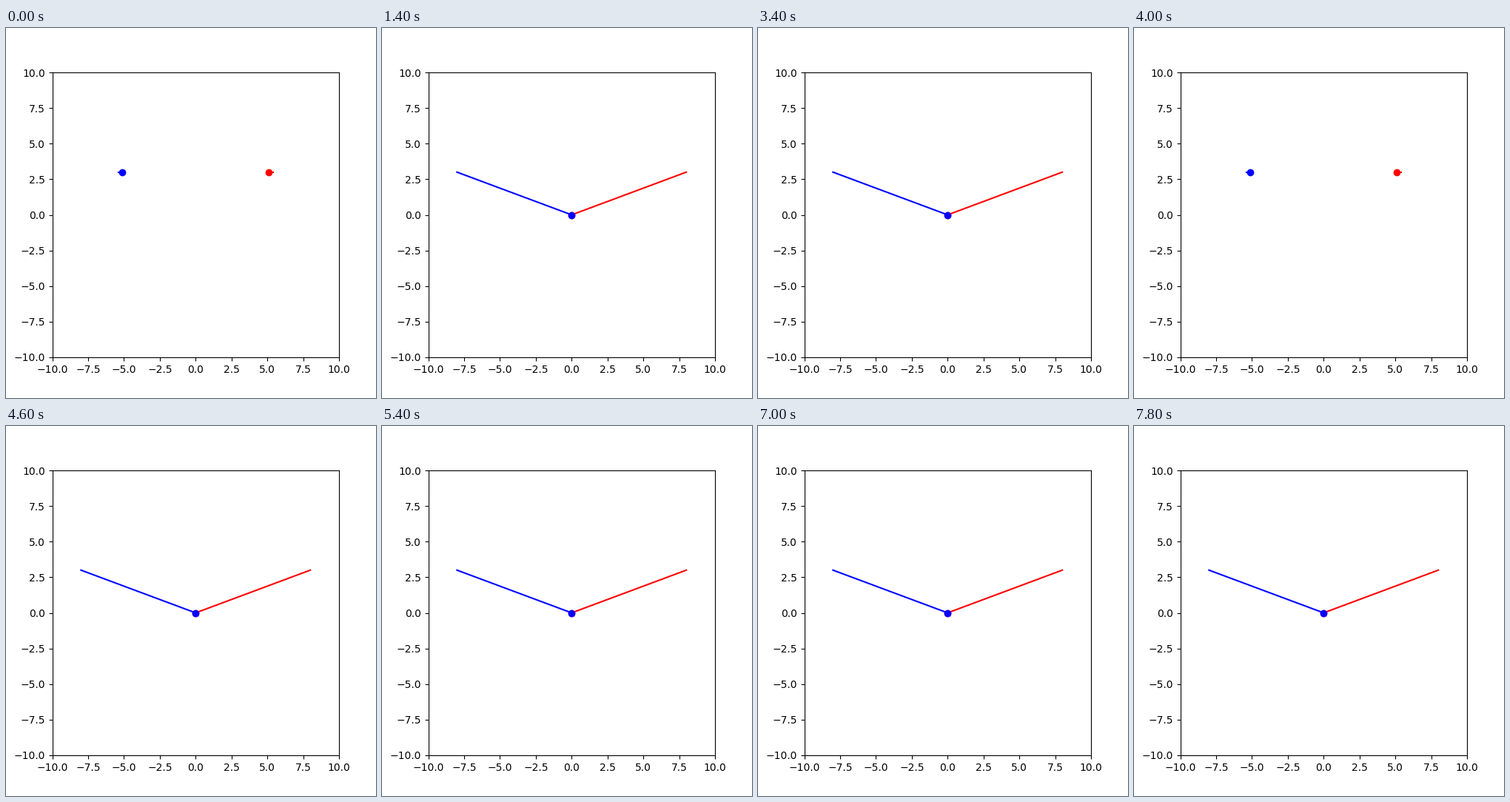
A matplotlib script for the animation above (8000 ms loop, 500 px wide and 500 px high).

```python
import matplotlib.pyplot as plt
from matplotlib.animation import FuncAnimation

STEP_MS = 200
FRAMES = 40

# Each pose: where the tail starts and where the dot sits, for the right side.
UPPER = ((5.4, 3), (5.12, 3))
MEET = ((8, 3), (0, 0))
LOWER = ((5.4, -3), (5.12, -3))
CYCLE = (UPPER, MEET, LOWER, MEET)

fig, ax = plt.subplots(figsize=(5, 5), dpi=100)
ax.set_xlim(-10, 10)
ax.set_ylim(-10, 10)


def particle(color):
    tail, = ax.plot([], [], "-", color=color)
    dot, = ax.plot([], [], "o", color=color)
    return tail, dot


# The sign mirrors the pose about the vertical axis.
particles = [(1, *particle("red")), (-1, *particle("blue"))]


def update(i):
    (x0, y0), (x1, y1) = CYCLE[i % len(CYCLE)]
    artists = []
    for sign, tail, dot in particles:
        tail.set_data([sign * x0, sign * x1], [y0, y1])
        dot.set_data([sign * x1], [y1])
        artists += [tail, dot]
    return artists


def init():
    return update(0)


anim = FuncAnimation(fig, update, frames=FRAMES, init_func=init,
                     interval=STEP_MS, repeat=True, repeat_delay=0)
plt.show()
```
